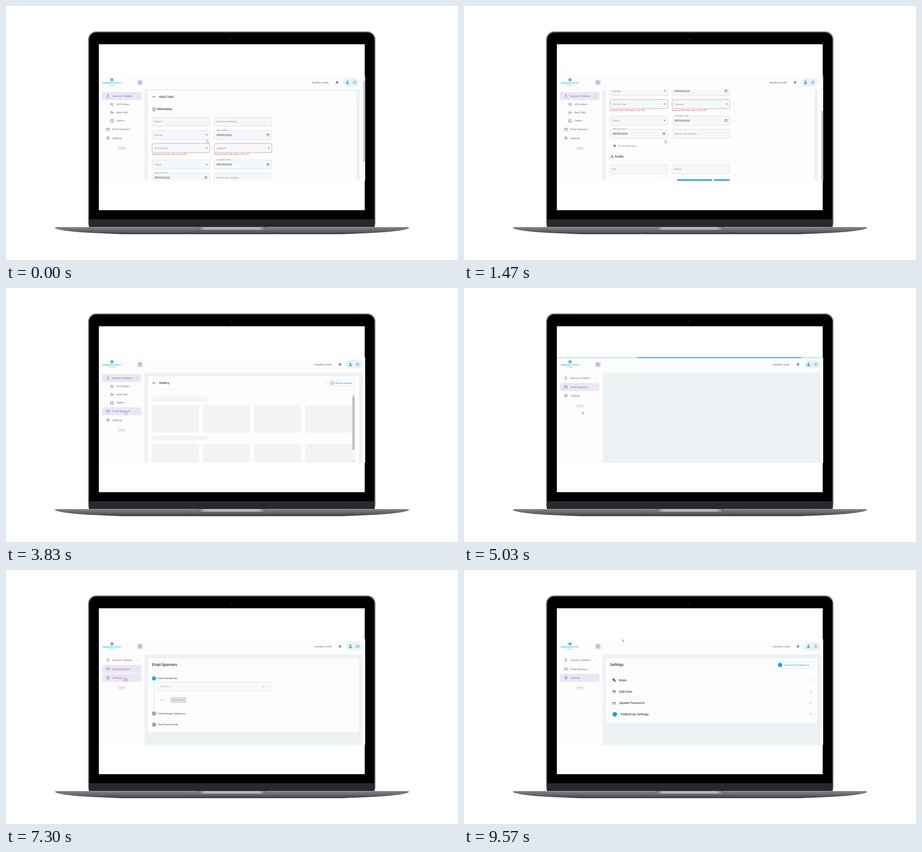
These frames come from a looping animation (998x561 px, 9710 ms). An HTML page:

```html
<!DOCTYPE html>
<html lang="en">
<head>
<meta charset="utf-8">
<title>Admin portal on a laptop</title>
<style>
html,body{margin:0;width:100%;height:100%;overflow:hidden;background:#fff}
svg{display:block;width:998px;height:561px;font-family:Inter,sans-serif}
.ic{fill:none;stroke:currentColor;stroke-width:2;stroke-linecap:round;stroke-linejoin:round}
[class^=k-]{animation:9.71s step-end infinite}
.move{animation-timing-function:linear!important}

/* pages */
.k-add{animation-name:add!important}
@keyframes add{0%{visibility:visible}27.5%,100%{visibility:hidden}}
.k-gallery{animation-name:gallery!important}
@keyframes gallery{0%{visibility:hidden}27.5%{visibility:visible}45.62%,100%{visibility:hidden}}
.k-empty{animation-name:empty!important}
@keyframes empty{0%{visibility:hidden}27.5%,100%{visibility:visible}}
.k-load{animation-name:load!important}
@keyframes load{0%{visibility:hidden}45.54%{visibility:visible}58.7%{visibility:hidden}75.7%{visibility:visible}81.87%,100%{visibility:hidden}}
.k-email{animation-name:email!important}
@keyframes email{0%{visibility:hidden}58.7%{visibility:visible}75.7%,100%{visibility:hidden}}
.k-settings{animation-name:settings!important}
@keyframes settings{0%{visibility:hidden}81.87%,100%{visibility:visible}}

/* scrolling form */
.k-scroll{animation-name:scroll!important}
@keyframes scroll{0%,5.46%{transform:none}8.24%,10.99%{transform:translateY(8.5px)}11.02%{transform:translateY(2.7px)}11.4%{transform:translateY(-45px)}12.05%,100%{transform:translateY(-97px)}}
.k-thumb{animation-name:thumb!important}
@keyframes thumb{0%,5.46%{transform:none}8.24%,10.99%{transform:translateY(-5.9px)}11.02%{transform:translateY(-1.9px)}11.4%{transform:translateY(31px)}12.05%,100%{transform:translateY(67px)}}
.k-hover{animation-name:hover!important}
@keyframes hover{0%{visibility:hidden}8.24%{visibility:inherit}15.14%,100%{visibility:hidden}}

/* sidebar and header */
.k-head{animation-name:head!important}
@keyframes head{0%{transform:none}27.5%,100%{transform:translateX(6.5px)}}
.k-sub{animation-name:sub!important}
@keyframes sub{0%,45.62%{opacity:1}47.5%,100%{opacity:0}}
.k-lower{animation-name:lower!important}
@keyframes lower{0%{transform:none}45.62%{transform:none;animation-timing-function:cubic-bezier(.4,0,.2,1)}48.7%,100%{transform:translateY(-53.6px)}}
.k-chev{animation-name:chev!important;transform-origin:290px 199px}
@keyframes chev{0%{transform:rotate(180deg)}45.62%,100%{transform:none}}
.k-c1{animation-name:c1!important}
@keyframes c1{0%{color:#7d5fa8}45.62%,100%{color:#5d6167}}
.k-c2{animation-name:c2!important}
@keyframes c2{0%{color:#62518f}27.5%,100%{color:#5d6167}}
.k-c3{animation-name:c3!important}
@keyframes c3{0%{color:#5d6167}24%,100%{color:#62518f}}
.k-c4{animation-name:c4!important}
@keyframes c4{0%{color:#5d6167}37.08%{color:#7d5fa8}75.7%,100%{color:#5d6167}}
.k-c5{animation-name:c5!important}
@keyframes c5{0%{color:#5d6167}73.43%,100%{color:#7d5fa8}}
.k-b1{animation-name:b1!important}
@keyframes b1{0%{visibility:visible}45.62%,100%{visibility:hidden}}
.k-b4{animation-name:b4!important}
@keyframes b4{0%{visibility:hidden}37.08%{visibility:visible}75.7%,100%{visibility:hidden}}
.k-b5{animation-name:b5!important}
@keyframes b5{0%{visibility:hidden}73.43%,100%{visibility:visible}}
.k-ripple{animation-name:ripple!important}
@keyframes ripple{
0%,25.9%{transform:translate(274px,256px) scale(0)}26.47%{transform:translate(274px,256px) scale(.9)}27.48%{transform:translate(274px,256px) scale(3)}
27.5%,45%{transform:translate(262px,274px) scale(0)}45.6%{transform:translate(262px,274px) scale(2)}
45.62%,74.7%{transform:translate(263px,241px) scale(0)}75.2%{transform:translate(263px,241px) scale(.55)}76.5%{transform:translate(263px,241px) scale(3)}
76.52%,100%{transform:scale(0)}}

/* progress */
.k-bar1,.k-bar2{transform-origin:0 0}
.k-bar1{animation-name:bar1!important}
@keyframes bar1{0%{transform:translateX(-205.8px) scaleX(.35)}
45.54%{transform:translateX(-205.8px) scaleX(.35);animation-timing-function:cubic-bezier(.65,.815,.735,.395)}
58.52%{transform:translateX(588px) scaleX(.9)}58.53%{transform:translateX(-205.8px) scaleX(.35)}
75.7%{transform:translateX(-205.8px) scaleX(.35);animation-timing-function:cubic-bezier(.65,.815,.735,.395)}
88.67%,100%{transform:translateX(588px) scaleX(.9)}}
.k-bar2{animation-name:bar2!important}
@keyframes bar2{0%{transform:translateX(-1176px) scaleX(2)}
57.38%{transform:translateX(-1176px) scaleX(2);animation-timing-function:cubic-bezier(.165,.84,.44,1)}
70.36%,100%{transform:translateX(629px) scaleX(.01)}}
.spin{transform-origin:569.5px 257.5px;animation:spin 1.38714s linear infinite}
@keyframes spin{from{transform:rotate(35deg)}to{transform:rotate(395deg)}}

/* pointer */
.k-ptr{animation-name:ptr!important}
@keyframes ptr{
0%{visibility:hidden;transform:translate(443px,296px)}
7.83%,18.23%{visibility:visible;transform:translate(443px,296px)}
20.1%{transform:translate(557px,378px)}
24%,32.2%{transform:translate(273px,258px)}
39%{transform:translate(262px,273px)}
71%{transform:translate(261px,273px)}
73.6%,81.4%{transform:translate(263.5px,240px)}
86.5%{transform:translate(466px,268px)}
87.2%,89.3%{transform:translate(484px,268px)}
92.5%{transform:translate(640px,300px)}
96%{transform:translate(430px,290px)}
98.56%,100%{visibility:visible;transform:translate(350px,153px)}}
.k-hand{animation-name:hand!important}
@keyframes hand{0%{opacity:1}45.62%{opacity:0}72.5%{opacity:1}82.4%,100%{opacity:0}}
.k-arrow{animation-name:arrow!important}
@keyframes arrow{0%{opacity:0}45.62%{opacity:1}72.5%{opacity:0}82.4%,100%{opacity:1}}
</style>
</head>
<body>
<svg id="stage" viewBox="0 0 998 561"></svg>
<script>
const BLUE = '#2f9fdb', GREY = '#74797f', DARK = '#303236', LILAC = '#ebe5f4';

const P = {
  bag: 'M9 3h6l-2 5h-2zM10 8C6 11 4 14 4 17a4 4 0 0 0 4 4h8a4 4 0 0 0 4-4c0-3-2-6-6-9',
  users: 'M9 11a4 4 0 1 0 0-8 4 4 0 0 0 0 8M2 21v-2a5 5 0 0 1 5-5h4a5 5 0 0 1 5 5v2M16 3a4 4 0 0 1 0 8M22 21v-2a4 4 0 0 0-3-4',
  plus: 'M9 11a4 4 0 1 0 0-8 4 4 0 0 0 0 8M2 21v-2a5 5 0 0 1 5-5h4a5 5 0 0 1 5 5v2M19 8v7M15.500 11.500h7',
  user: 'M12 11a4 4 0 1 0 0-8 4 4 0 0 0 0 8M4 22v-3a5 5 0 0 1 5-5h6a5 5 0 0 1 5 5v3',
  image: 'M3 3h18v18H3zM3 15l5-4 5 6 3-3 5 4M15 8h1',
  mail: 'M3 5h18v14H3zM3 6l9 7 9-7',
  gear: 'M12 2l3 2.500h4l1 4 2 3.500-2 3.500-1 4h-4l-3 2.500-3-2.500H5l-1-4L2 12l2-3.500 1-4h4zM12 8.500a3.500 3.500 0 1 0 0 7 3.500 3.500 0 0 0 0-7',
  info: 'M12 2a10 10 0 1 0 0 20 10 10 0 0 0 0-20M12 11v6M12 7v.5',
  cal: 'M4 5h16v15H4zM4 7h16M8 3v2M16 3v2',
  down: 'M6 9l6 6 6-6',
  back: 'M20 12H4M11 5l-7 7 7 7',
  wrench: 'M22.7 19l-9.100-9.100c.9-2.300.4-5-1.500-6.900-2-2-5-2.400-7.400-1.300L9 6 6 9 1.600 4.700C.4 7.100.9 10.100 2.900 12.100c1.900 1.900 4.600 2.400 6.900 1.500l9.100 9.100c.4.4 1 .4 1.400 0l2.300-2.300c.5-.4.5-1.100.1-1.400z',
  pass: 'M3 18h18M5 9v3M12 9v3M19 9v3M3 10.500h4M10 10.500h4M17 10.500h4'
};

const g = (cls, body, more = '') => `<g class="${cls}" ${more}>${body}</g>`;
const rect = (x, y, w, h, r, fill, more = '') =>
  `<rect x="${x}" y="${y}" width="${w}" height="${h}" rx="${r}" fill="${fill}" ${more}/>`;
const dot = (x, y, r, fill) => `<circle cx="${x}" cy="${y}" r="${r}" fill="${fill}"/>`;
// y is the middle of the line
const text = (x, y, s, size = 5.4, fill = GREY, more = '') =>
  `<text x="${x}" y="${y + size * .36}" font-size="${size}" fill="${fill}" ${more}>${s}</text>`;
const icon = (x, y, name, color = 'currentColor', size = 8, more = '') =>
  `<path class="ic" d="${P[name]}" color="${color}" transform="translate(${x - size / 2} ${y - size / 2}) scale(${size / 24})" ${more}/>`;
const line = (x, y, w) => rect(x, y, w, .6, 0, '#eff0f1');
const MED = 'font-weight="500"', SEMI = 'font-weight="600"', MID = 'text-anchor="middle"';

function field(x, y, label, o = {}) {
  const w = o.w || 127.5, edge = o.bad ? '#e0848a' : '#d3dae0';
  let s = rect(x, y - 10, w, 20, 4, '#f5f8fa', `stroke="${edge}" stroke-width=".8"`);
  if (o.date) {
    s += rect(x + 4, y - 11, label.length * 2.05 + 2, 2, 0, '#fafbfc') + text(x + 5.5, y - 10.3, label, 4.05);
    s += text(x + 5.5, y, 'dd/mm/yyyy', 5.7, DARK) + icon(x + 119, y, 'cal', DARK, 6.5, 'stroke-width="3"');
  } else s += text(x + 5.5, y, label, 5.35, '#858b91');
  if (o.menu) s += `<path d="M${x + w - 9} ${y - 1}h4.400l-2.200 2.400z" fill="#666"/>`;
  if (o.bad) s += text(x, y + 13.5, 'Request failed with status code 400', 4.55, '#d0555c');
  return s;
}

function laptop() {
  return rect(181, 56, 635, 440, 18, '#8d8f8f') + rect(183.3, 58.3, 630.4, 440, 16, '#000') +
    rect(183, 471, 631, 18, 0, '#29282e') + dot(497.500, 74, 2.4, '#101114') +
    rect(205, 84.5, 587, 366.5, 0, '#fff') +
    '<path d="M109 488H889V491.500C872 497 838 500 800 501.500L742 504H256L198 501.500C160 500 126 497 109 491.500Z" fill="url(#base)"/>' +
    rect(109, 488, 780, 1, 0, '#a5a6a8') +
    '<path d="M424 488H573V490Q572 494 567 494H430Q425 494 424 490Z" fill="url(#notch)"/>' +
    rect(400, 499.5, 6, 1, .5, '#35353a') + rect(592, 499.5, 6, 1, .5, '#35353a');
}

function header() {
  return dot(234, 163, 3.6, '#54b9e6') +
    text(234, 170.3, 'MEADOW OF KITES', 4.2, '#54b9e6', MID + ' font-weight="700"') +
    text(234, 175.2, 'Foundation', 3, '#54b9e6', MID) +
    rect(289.5, 162.5, 12.5, 12.5, 3, '#e4dbf1') +
    [166.2, 168.5, 170.8].map(y => rect(292.8, y, 6, .7, 0, '#6b5494')).join('') +
    g('k-head', text(674.5, 168.7, 'Sandbox mode', 5.4, '#5d6167') +
      rect(725, 166, 8.8, 5.4, 2.4, '#929292') + dot(725.5, 168.7, 3.4, '#fff') +
      rect(744.5, 159, 35.5, 19, 9.5, '#ebf1f5') +
      dot(754, 166.7, 1.9, BLUE) + '<path d="M750.300 172.300c0-4 7.400-4 7.400 0z" fill="' + BLUE + '"/>' +
      icon(770, 168.7, 'gear', BLUE, 8.5));
}

function sidebar() {
  const item = (cls, ix, x, y, name, label) =>
    g(cls, icon(ix, y, name) + text(x, y, label, 5.35, 'currentColor'));
  const bg = (cls, y) => g(cls, rect(212, y - 8.8, 87, 17.6, 4, LILAC));
  return bg('k-b1', 199) + item('k-c1', 225, 235, 199, 'bag', 'Sponsor Children') +
    g('k-chev', icon(290, 199, 'down', '#666', 5.5)) +
    g('k-sub move', g('', item('', 234, 244, 217.5, 'users', 'All Children'), 'color="#5d6167"') +
      item('k-c2', 234, 244, 235.5, 'plus', 'Add Child') +
      item('k-c3', 234, 244, 253.5, 'image', 'Gallery')) +
    g('k-lower move', bg('k-b4', 272.2) + bg('k-b5', 291.7) +
      item('k-c4', 225, 235, 272.2, 'mail', 'Email Sponsors') +
      item('k-c5', 225, 235, 291.7, 'gear', 'Settings') +
      line(222, 307, 76) + rect(246.5, 310.5, 18, 8, 2, '#f0f0f1') + text(255.5, 314.5, 'v1.0.0', 4.4, '#b0b1b3', MID)) +
    g('', g('k-ripple move', dot(0, 0, 10, 'rgba(110,80,160,.14)')), 'clip-path="url(#rows)"');
}

function addPage() {
  const a = 322.5, b = 459.5;
  const form = rect(306, 178.5, 475, 400, 3, '#ecf1f4') + rect(313, 186.7, 461, 320, 4, '#fdfdfd') +
    icon(327, 200.3, 'back', '#222', 8) + text(338, 200.3, 'Add Child', 6.8, DARK, MED) + line(313, 213.8, 461) +
    icon(327, 228.3, 'info', '#222', 8.5) + text(333.3, 228.3, 'Information', 6.1, DARK, SEMI) + line(322, 237.5, 443) +
    field(a, 255.5, 'Name *') + field(b, 255.5, 'Previous Name(s)') +
    field(a, 284.8, 'Gender', { menu: 1 }) + field(b, 284.8, 'Date of Birth', { date: 1 }) +
    g('k-hover', rect(a, 274.8, 127.5, 20, 4, 'none', 'stroke="#888d93" stroke-width=".9"')) +
    field(a, 313.7, 'School Year', { menu: 1, bad: 1 }) + field(b, 313.7, 'Campus', { menu: 1, bad: 1 }) +
    field(a, 350.2, 'Status', { menu: 1 }) + field(b, 350.2, 'Graduated Date', { date: 1 }) +
    field(a, 379.2, 'Date Left School', { date: 1 }) + field(b, 379.2, 'Reason for Leaving') +
    rect(326, 403.3, 9.5, 5.2, 2.4, '#929292') + dot(327, 406, 3.2, '#fff') + text(340.5, 406, 'Do not Sponsor') +
    icon(327, 430, 'user', '#222', 8.5) + text(333.3, 430, 'Profile', 6.1, DARK, SEMI) + line(322, 438.5, 443) +
    field(a, 457.3, 'Bio') + field(b, 457.3, 'Notes') +
    rect(432, 480, 35, 14, 3, '#fff', 'stroke="#d5e6f0" stroke-width=".7"') +
    rect(470, 479.7, 78, 14, 3, BLUE) + rect(551, 479.7, 36, 14, 3, BLUE);
  return g('k-add', g('', g('k-scroll move', form), 'clip-path="url(#body)"') +
    rect(788.7, 153, 4.3, 233, 0, '#f8f8f8') + '<path d="M789.800 157.500h2.800l-1.400-2z" fill="#555"/>' +
    g('k-thumb move', rect(789.3, 165, 3, 179, 0, '#b9babb')));
}

function galleryPage() {
  const row = y => rect(322.5, y, 123, 11.3, 2.5, '#f3f3f4') +
    [322.5, 435, 547.8, 660].map(x => rect(x, y + 18, 104, 61.5, 4.5, '#f3f3f4')).join('');
  return g('k-gallery', rect(313.3, 195, 466.7, 210, 4, '#fdfdfd') +
    icon(327, 210, 'back', '#222', 8) + text(338, 210, 'Gallery', 6.8, DARK, MED) +
    rect(709.5, 203, 61, 13.5, 3, '#fff', 'stroke="#c6dfee" stroke-width=".7"') +
    icon(719.7, 209.8, 'image', BLUE, 8.5) + text(726, 209.8, 'Upload Images', 5.3, BLUE, MED) +
    line(313, 224, 467) + row(240) + row(326) +
    rect(764.3, 233.5, 6, 153, 0, '#f7f7f7') + rect(764.6, 240, 5.4, 117, 0, '#bfc0c1') +
    '<path d="M765.700 238.500h3.200l-1.600-2zM765.700 381.500h3.200l-1.600 2z" fill="#777"/>', 'clip-path="url(#body)"');
}

function emailPage() {
  const step = (y, n, label, color) => dot(327, y, 4.7, color) +
    text(327, y, n, 4.2, '#fff', MID) + text(335, y, label, 5.25, '#4d5157', MED);
  return g('k-email', rect(313.3, 195, 466.7, 163.5, 4, '#fdfdfd') +
    text(322.5, 209, 'Email Sponsors', 7.45, DARK, SEMI) + line(313, 222.3, 467) +
    rect(326.7, 246, .6, 63, 0, '#d0d2d4') + rect(326.7, 324, .6, 10, 0, '#d0d2d4') +
    step(239.5, 1, 'Select Recipients', BLUE) + step(317, 2, 'Select Image Categories', '#9c9d9f') +
    step(341.5, 3, 'Test &amp; Send Email', '#9c9d9f') +
    g('', field(335, 257.5, 'Sponsors', { w: 253 }), 'opacity=".75"') + icon(580, 257.5, 'down', '#888', 5) +
    `<circle class="spin" cx="569.5" cy="257.5" r="3.300" fill="none" stroke="${BLUE}" stroke-width=".8" pathLength="100" stroke-dasharray="28 72"/>` +
    text(347.3, 287, 'Back', 5.3, '#bfc0c2', MID) + rect(363, 280.3, 35.3, 13.4, 3, '#dfdfe0') +
    text(380.6, 287, 'Continue', 5.3, '#aeafb0', MID));
}

function settingsPage() {
  const row = (y, mark, label, x = 342) => mark + text(x, y, label, 6.7, DARK, MED) + icon(765.5, y, 'down', '#444', 7);
  return g('k-settings', rect(313.3, 195, 466.7, 142.3, 4, '#fdfdfd') +
    text(322.5, 209.7, 'Settings', 7.5, DARK, SEMI) + line(313, 224, 467) +
    rect(685, 203, 85.5, 13.4, 3, '#fff', 'stroke="#c6dfee" stroke-width=".7"') +
    dot(698, 209.7, 4.8, '#159fdb') + text(706, 209.7, 'Connect To Pellbarrow', 5.2, BLUE, MED) +
    row(243.2, icon(331.5, 243.2, 'wrench', '#222', 8.5, 'style="fill:#222;stroke:none"'), 'Roles') +
    row(268.4, icon(331.5, 268.4, 'plus', '#222', 9), 'Add User') +
    row(293.6, icon(331.5, 293.6, 'pass', '#222', 9.5), 'Update Password') +
    row(318.8, dot(333, 318.8, 5, '#159fdb'), 'Pellbarrow Settings', 346) +
    [255.8, 281, 306.2].map(y => line(322, y, 449)).join(''));
}

const progress = g('k-load', rect(205, 153, 588, 2, 0, '#b9def2') +
  g('', ['k-bar1', 'k-bar2'].map(c => g(c + ' move', rect(0, 153, 588, 2, 0, BLUE))).join(''), 'transform="translate(205)"'));

const pointer = g('k-ptr move',
  g('k-hand', '<path d="M1 .5q.9-.5 1.100.5v2.200l2.600.6q.8.300.6 1.300l-.6 2.400H1.800L-.3 4.600q.2-.8 1.100 0z" fill="#fff" stroke="#666" stroke-width=".6"/>') +
  g('k-arrow', '<path d="M0 0v5l1.200-1 .9 2 .9-.4-.9-1.900h1.500z" fill="#fff" stroke="#555" stroke-width=".6"/>'));

const defs = `<defs>
<linearGradient id="base" x2="0" y2="1"><stop stop-color="#85868a"/><stop offset=".5" stop-color="#66666b"/><stop offset="1" stop-color="#3c3c41"/></linearGradient>
<linearGradient id="notch"><stop stop-color="#6c6d70"/><stop offset=".1" stop-color="#b4b5b8"/><stop offset=".9" stop-color="#b4b5b8"/><stop offset="1" stop-color="#6c6d70"/></linearGradient>
<clipPath id="video"><path d="M205 153H793V386H205z"/></clipPath>
<clipPath id="body"><path d="M306 184H788V386H306z"/></clipPath>
<clipPath id="rows"><path d="M212 246H299V262H212zM212 263.500H299V281H212zM212 229H299V247H212z"/></clipPath>
</defs>`;

document.getElementById('stage').innerHTML = defs + laptop() + g('',
  rect(205, 153, 588, 233, 0, '#fdfdfd') + header() + sidebar() + addPage() +
  g('k-empty', rect(306, 187, 482, 210, 3, '#ecf1f4')) +
  galleryPage() + emailPage() + settingsPage() + progress + pointer, 'clip-path="url(#video)"');
</script>
</body>
</html>
```
